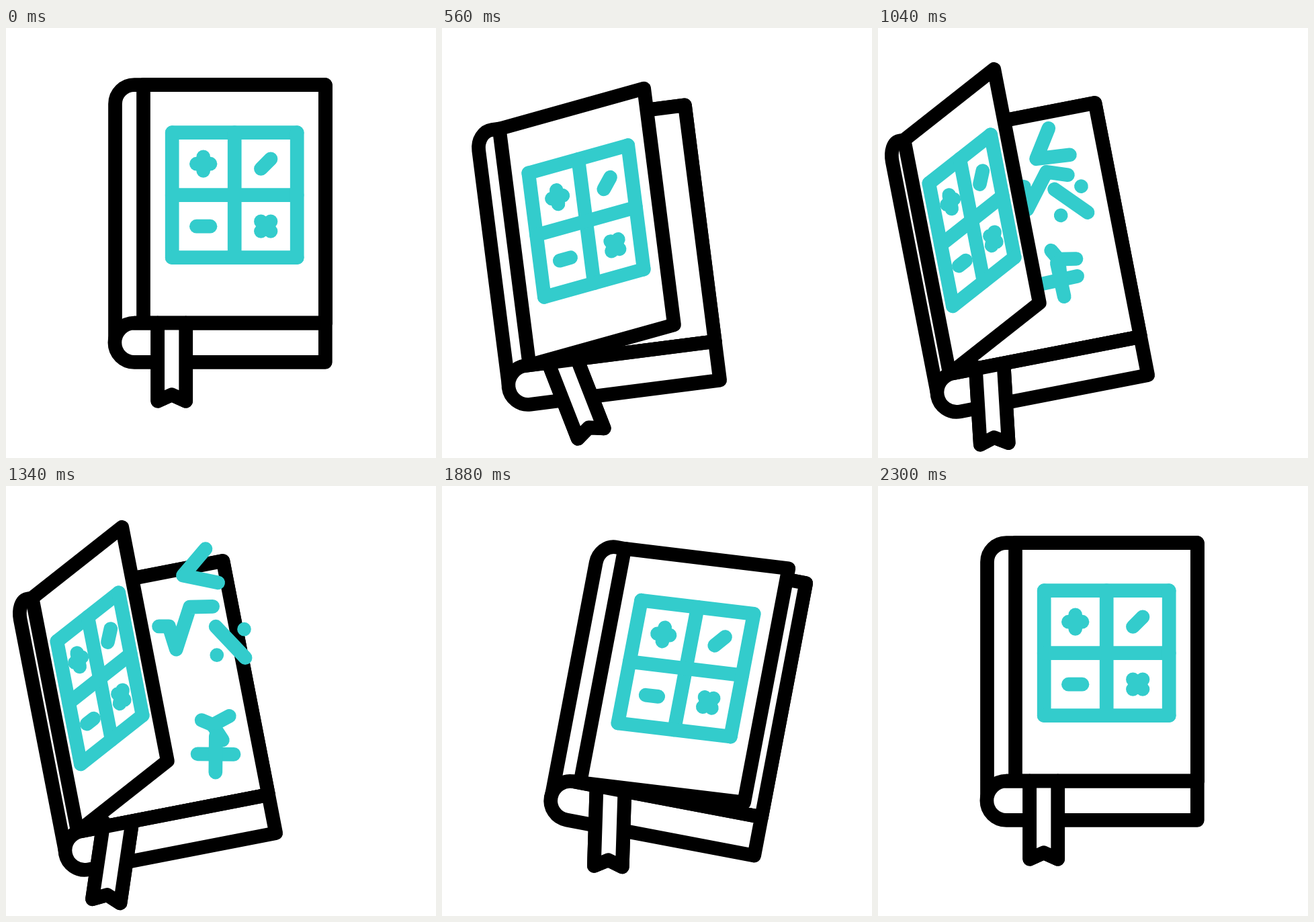
Write an HTML page with a canvas that moves like this. It is 640 px wide and 640 px high and loops after 2400 ms.

```html
<!DOCTYPE html>
<html lang="en">
<head>
<meta charset="utf-8">
<title>Math book</title>
<style>
html, body { margin: 0; width: 100%; height: 100%; overflow: hidden; background: #fff; }
canvas { display: block; width: 640px; height: 640px; }
</style>
</head>
<body>
<canvas id="stage" width="640" height="640"></canvas>
<script>
const ctx = document.getElementById('stage').getContext('2d');
const LOOP = 2400, INK = '#000', CYAN = '#33cccc', RAD = Math.PI / 180;
const SPINE = 162.5, HINGE = 204.5, RIGHT = 475.3, TOP = 84.7, PAGE = 439.2, BASE = 497.4;
const CURL = { x: 191, y: 468 };      // centre of the rounded spine end, the book turns here
const SOURCE = { x: 291, y: 258 };    // the signs fly out from here

const ease = (t, from, to) => {
  const x = Math.min(1, Math.max(0, (t - from) / (to - from)));
  return x * x * (3 - 2 * x);
};
const polar = (r, deg) => [r * Math.cos(deg * RAD), r * Math.sin(deg * RAD)];
const bar = (half, deg) => [polar(-half, deg), polar(half, deg)];
const dot = (r, deg) => [polar(r, deg), polar(r, deg)];

// Each sign has its outermost place, its spin on the way, and when it is home again.
const SIGNS = [
  { x: 436, y: 90, spin: -150, end: 2000,
    lines: [[polar(35, -68), polar(22, 162), polar(36, 30)]] },
  { x: 465, y: 205, spin: -95, end: 2000,
    lines: [bar(32, 47), dot(28, -43), dot(28, 137)] },
  { x: 415, y: 322, spin: 218, end: 1900,
    lines: [[polar(18, 202), [0, 0], polar(28, -29)], [[0, 0], polar(27, 56)]] },
  { x: 411, y: 366, spin: -105, end: 1915,
    lines: [bar(27, 1), bar(27, 91)] },
  { x: 403, y: 171, spin: 75, end: 1810,
    lines: [[[-40, -2], [-25, -2], [-14, 32], [6, -31], [40, -32]]] }
];

function line(points, color = INK, map = p => p) {
  ctx.beginPath();
  points.forEach(p => ctx.lineTo(...map(p)));
  ctx.strokeStyle = color;
  ctx.stroke();
}

function shape(points) {
  line(points);
  ctx.fill();
  ctx.stroke();
}

function drawSign({ x, y, spin, end, lines }, t) {
  const leaving = t < 1450;
  const p = leaving ? ease(t, 415, 1400) : 1 - ease(t, 1505, end);
  if (p <= 0) return;
  const size = Math.min(1, p * (leaving ? 1.35 : 2.5));
  ctx.save();
  ctx.translate(SOURCE.x + (x - SOURCE.x) * p, SOURCE.y + (y - SOURCE.y) * p);
  ctx.rotate((11 + spin * (1 - p) * (leaving ? .42 : 1)) * RAD);
  lines.forEach(l => line(l, CYAN, q => q.map(v => v * size)));
  ctx.restore();
}

// Opening narrows the cover towards the spine and raises its free edge.
function drawCover(lift) {
  const scale = 1 - lift / 177;
  const mapFrom = edge => ([x, y]) =>
    [SPINE + (x - SPINE) * scale, y - lift * Math.max(0, x - edge) / (RIGHT - HINGE)];
  const map = mapFrom(HINGE), grid = mapFrom(245);

  ctx.beginPath();
  ctx.moveTo(SPINE, CURL.y);
  ctx.lineTo(SPINE, 113);
  ctx.bezierCurveTo(SPINE, 97.3, ...map([175.3, TOP]), ...map([CURL.x, TOP]));
  [[HINGE, TOP], [RIGHT, TOP], [RIGHT, PAGE], [HINGE, PAGE]].forEach(p => ctx.lineTo(...map(p)));
  ctx.fill();
  ctx.strokeStyle = INK;
  ctx.stroke();
  line([[HINGE, TOP], [HINGE, PAGE]], INK, map);

  const left = 247.2, top = 155.7, cell = 93;
  for (let i = 0; i < 3; i++) {
    const x = left + i * cell, y = top + i * cell;
    line([[x, top], [x, top + 2 * cell]], CYAN, grid);
    line([[left, y], [left + 2 * cell, y]], CYAN, grid);
  }
  // plus, divide, minus, times
  [[0, 90], [-45], [0], [45, -45]].forEach((angles, i) => {
    const cx = left + cell * (i % 2 + .5), cy = top + cell * ((i >> 1) + .5);
    angles.forEach(a => line(bar(10.3, a).map(([x, y]) => [cx + x, cy + y]), CYAN, grid));
  });
}

function drawBase() {
  ctx.beginPath();
  ctx.moveTo(RIGHT, PAGE);
  ctx.lineTo(RIGHT, BASE);
  ctx.arc(CURL.x, (PAGE + BASE) / 2, (BASE - PAGE) / 2, Math.PI / 2, Math.PI * 1.5);
  ctx.closePath();
  ctx.fill();
  ctx.strokeStyle = INK;
  ctx.stroke();
}

function drawRibbon(swing) {
  ctx.save();
  ctx.translate(246.7, PAGE);
  ctx.rotate(swing * RAD);
  shape([[-21, 0], [-21, 116], [0, 106.5], [21, 116], [21, 0]]);
  ctx.restore();
  line([[CURL.x, PAGE], [RIGHT, PAGE]]);
}

function draw() {
  const t = performance.now() % LOOP;
  const back = ease(t, 1508, 1890), settle = ease(t, 1890, 2300);
  const shift = 74 * (ease(t, 220, 670) - back);
  const tilt = -11 * ease(t, 220, 780) + 21.8 * back - 10.8 * settle;
  const lift = 78 * (ease(t, 220, 990) - ease(t, 1590, 2005));
  const swing = -15.5 * ease(t, 220, 640) + 34.9 * ease(t, 640, 1300) - 28.4 * back + 9 * settle;

  ctx.clearRect(0, 0, 640, 640);
  ctx.lineWidth = 20.7;
  ctx.lineCap = ctx.lineJoin = 'round';
  ctx.fillStyle = '#fff';
  ctx.save();
  ctx.translate(CURL.x - shift, CURL.y + shift);
  ctx.rotate(tilt * RAD);
  ctx.translate(-CURL.x, -CURL.y);
  shape([[HINGE, TOP], [RIGHT, TOP], [RIGHT, PAGE], [HINGE, PAGE]]);
  SIGNS.forEach(sign => drawSign(sign, t));
  drawCover(lift);
  drawBase();
  drawRibbon(swing);
  ctx.restore();
  requestAnimationFrame(draw);
}
draw();
</script>
</body>
</html>
```
